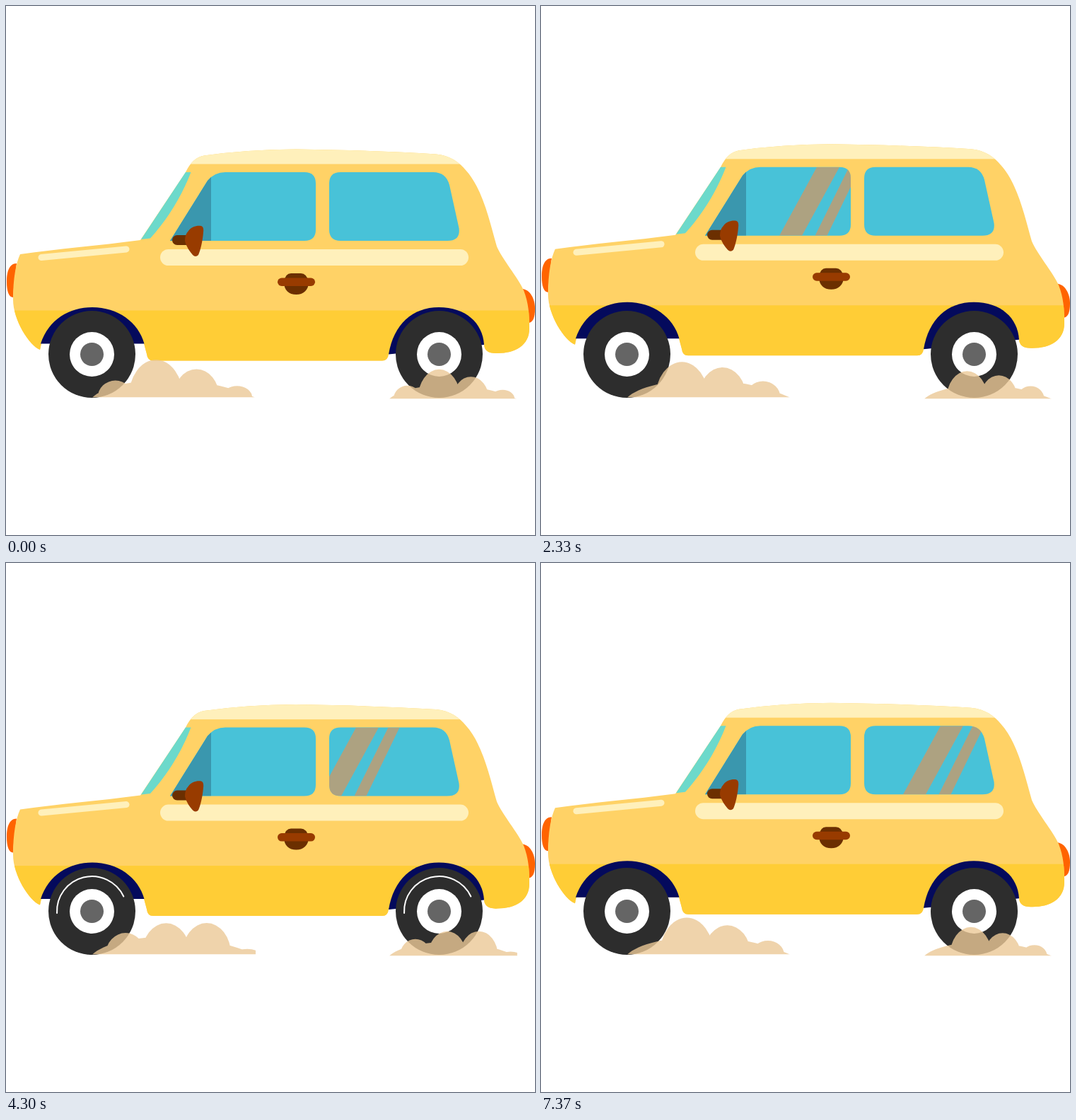
An HTML page for the animation above (7410 ms loop, 748x748 px).

```html
<!DOCTYPE html>
<html lang="en">
<head>
<meta charset="utf-8">
<title>Yellow car</title>
<style>
  html, body { margin: 0; width: 100%; height: 100%; overflow: hidden; background: #fff; }
  svg { display: block; width: 100%; height: 100%; }
</style>
</head>
<body>
<svg viewBox="0 0 748 748">
  <defs>
    <path id="bodyShape" d="M50 477L48 486C33 480 10 444 10 415C10 385 14 364 20 351
      C75 343 130 339 190 331L254 235Q264 214 280 211.500Q340 203 410 202.500Q520 204 608 209.500
      C628 211 642 222 650 232C674 258 684 305 694 340C701 357 724 384 732 402
      C739 420 740 436 740 456C740 480 720 491 695 491Q676 492 676 478L541 492Q540 501.500 532 501.500
      H208Q200 501.500 199 492L195 477Z"/>
    <path id="frontGlass" d="M232 332L285 247Q295 235 310 235H422Q438 235 438 251V316Q438 332 422 332Z"/>
    <path id="rearGlass" d="M473 235H604Q622 235 627 253L640.500 314Q643 332 624 332H473Q457 332 457 316V251Q457 235 473 235Z"/>
    <clipPath id="bodyClip"><use href="#bodyShape"/></clipPath>
    <clipPath id="frontClip"><use href="#frontGlass"/></clipPath>
    <clipPath id="glassClip"><use href="#frontGlass"/><use href="#rearGlass"/></clipPath>
    <clipPath id="dustClip"><rect x="122" y="-80" width="231" height="80"/></clipPath>
    <g id="wheel">
      <circle r="61.500" fill="#2d2d2d"/>
      <circle r="31.500" fill="#fff"/>
      <circle r="16.500" fill="#656565"/>
    </g>
  </defs>

  <g id="car">
    <g fill="#ff6400">
      <path d="M15 364C4 364 1 377 1 390C1 403 4 412 10 412C11 395 13 380 15 364Z"/>
      <path d="M730 400C741 401 748 414 748 428C748 441 745 448 738 448Z"/>
    </g>
    <g clip-path="url(#bodyClip)">
      <rect y="190" width="748" height="320" fill="#ffd266"/>
      <rect y="190" width="748" height="33.500" fill="#fff0bb"/>
      <rect y="430.500" width="748" height="80" fill="#ffcd36"/>
    </g>
    <g fill="#040a5c">
      <path d="M49 477.500C60 443 90 426 122 426C158 426 187 447 195.500 477.500Z"/>
      <path d="M541 492.500C548 450 575 426 612 426C650 426 674 448 676 479Z"/>
    </g>
    <path d="M191 330L254 235H261.500C248 270 228 302 204 328.500Z" fill="#6cd9cb"/>
    <use href="#frontGlass" fill="#48c2d8"/>
    <rect x="230" y="230" width="60" height="105" fill="#3a97ae" clip-path="url(#frontClip)"/>
    <use href="#rearGlass" fill="#48c2d8"/>
    <g clip-path="url(#glassClip)">
      <path id="glare" d="M0 332h32l53 -97h-32ZM50.500 332h17l47 -97h-16Z" fill="#f08e49" fill-opacity=".6"/>
    </g>
    <rect x="218" y="344" width="436" height="23" rx="11.500" fill="#fff0bb"/>
    <path d="M50 355.500L170 344" stroke="#fff0bb" stroke-width="9" stroke-linecap="round"/>
    <rect x="235" y="324" width="28" height="14" rx="7" fill="#6b2f00"/>
    <path d="M258 318C262 312 270 310 276 311Q280 312 279 320C278 333 275 345 272 352Q268 356 264 352C258 345 254 338 253 332Q253 323 258 318Z" fill="#983b00"/>
    <path d="M393 390Q395 378 403 378H417Q425 378 428 390C428 402 420 408 410.500 408C400 408 393 402 393 390Z" fill="#6b2f00"/>
    <rect x="384" y="384.500" width="53" height="11.500" rx="5.750" fill="#983b00"/>
  </g>

  <g fill="none" stroke="#fff" stroke-width="2" stroke-linecap="round">
    <g transform="translate(121.500 492.500)"><use href="#wheel" stroke="none"/><path id="frontArc"/></g>
    <g transform="translate(612.500 492.500)"><use href="#wheel" stroke="none"/><path id="rearArc"/></g>
  </g>

  <g fill="#ecc897" fill-opacity=".8">
    <g transform="translate(0 553.500)"><path class="dust" clip-path="url(#dustClip)"/></g>
    <g transform="translate(542 555.500) scale(.783) translate(-122 0)"><path class="dust" clip-path="url(#dustClip)"/></g>
  </g>
</svg>

<script>
const LOOP = 7410, LAST_POSE = 105;
const CYCLE = 53, BOB_STEPS = 9, GLARE_STEPS = 14, DUST_STEPS = 18;
const $ = id => document.getElementById(id);
const dustPaths = document.querySelectorAll('.dust');
const smooth = u => u * u * (3 - 2 * u);

// Tyre highlights: each turns at a steady rate while its length swells and fades.
const opening = { from: 0, to: 27, angle: -124, rate: 28.5, length: 158, skew: 0.6 };
const frontClosing = { from: 33.5, to: 52, angle: 817, rate: 38, length: 136, skew: 1 };
const rearClosing = { from: 35.5, to: 52, angle: 693, rate: 42, length: 150, skew: 1 };

function rimPoint(degrees) {
  const a = degrees * Math.PI / 180;
  return `${49.5 * Math.cos(a)} ${-49.5 * Math.sin(a)}`;
}

function highlight(step, { from, to, angle, rate, length, skew }) {
  const u = (step - from) / (to - from);
  if (u <= 0 || u >= 1) return '';
  const middle = angle + rate * (step - from);
  const half = length * Math.sin(Math.PI * u ** skew) / 2;
  return `M${rimPoint(middle - half)}A49.5 49.5 0 0 0 ${rimPoint(middle + half)}`;
}

// Puffs drift right by three spacings per cycle; every third one is larger.
function dustPath(step) {
  const left = 115, span = 237, spacing = 172 / 3;
  const travel = 3 * spacing * smooth(step / DUST_STEPS);
  let d = 'M122 0C150 -26 260 -40 352 0Z';
  for (let n = -3; n < 4; n++) {
    const x = 212 + spacing * n + travel;
    const u = (x - left) / span;
    if (u <= 0 || u >= 1) continue;
    const size = 1 + 0.15 * Math.cos(n * Math.PI * 2 / 3);
    const h = 48 * size * Math.sin(Math.PI * u) ** 0.9;
    const w = 14 + 0.46 * h;
    d += `M${x - w} 0A${w} ${h} 0 0 1 ${x + w} 0Z`;
  }
  return d;
}

function draw(ms) {
  // 70 ms poses, seen on a 30 Hz clock.
  const tick = Math.floor((ms % LOOP) * 0.03 + 0.15);
  const step = Math.min(LAST_POSE, Math.floor(tick / 2.1 + 1e-6)) % CYCLE;
  const bob = step % BOB_STEPS;

  $('car').setAttribute('transform', `translate(0 ${-2.4 * Math.min(bob, BOB_STEPS - bob)})`);
  $('glare').setAttribute('transform', `translate(${162 + 35 * (step % GLARE_STEPS)} 0)`);
  $('frontArc').setAttribute('d', highlight(step, opening) + highlight(step, frontClosing));
  $('rearArc').setAttribute('d', highlight(step, opening) + highlight(step, rearClosing));
  const dust = dustPath(step % DUST_STEPS);
  dustPaths.forEach(path => path.setAttribute('d', dust));
}

function loop(now) {
  draw(now);
  requestAnimationFrame(loop);
}
draw(0);
requestAnimationFrame(loop);
</script>
</body>
</html>
```
